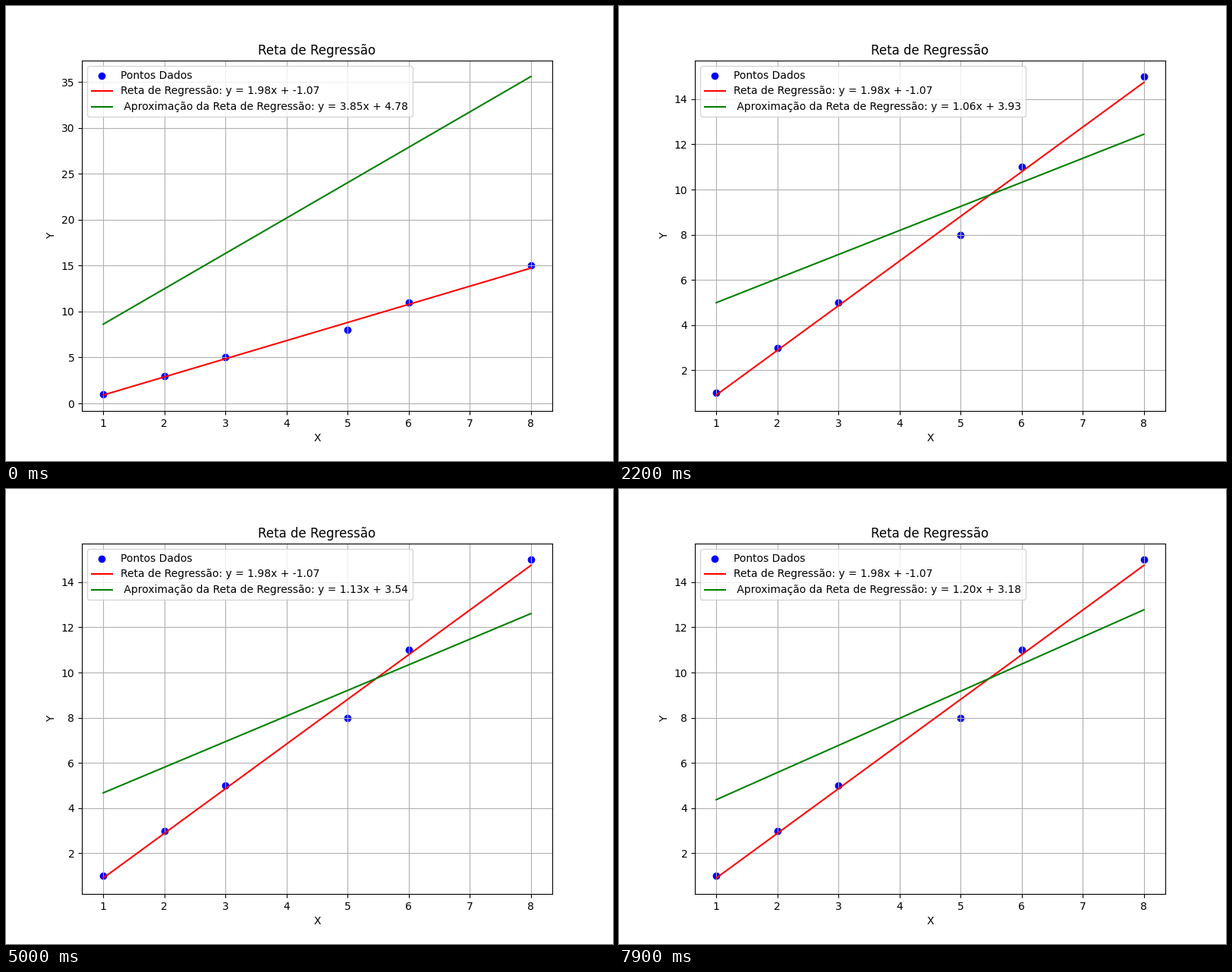
A matplotlib script for the animation above (8000 ms loop, 800 px wide and 600 px high).

```python
import numpy as np
import matplotlib.pyplot as plt
from matplotlib.animation import FuncAnimation

FRAMES = 80
RATE = 0.001
STEP = 0.01

x = np.array([1, 2, 3, 5, 6, 8], dtype=float)
y = np.array([1, 3, 5, 8, 11, 15], dtype=float)
slope, intercept = np.polyfit(x, y, 1)


def cost(m, b):
    return np.sum((y - (m * x + b)) ** 2)


def descend(m, b):
    """One gradient descent step using forward differences."""
    here = cost(m, b)
    dm = (cost(m + STEP, b) - here) / STEP
    db = (cost(m, b + STEP) - here) / STEP
    return m - RATE * dm, b - RATE * db


def descent_path(m, b, count):
    path = []
    for _ in range(count):
        m, b = descend(m, b)
        path.append((m, b))
    return path


path = descent_path(5.0, 5.0, FRAMES)

fig, ax = plt.subplots(figsize=(8, 6), dpi=100)


def draw(i):
    m, b = path[i]
    ax.clear()
    ax.scatter(x, y, color="blue", label="Pontos Dados")
    ax.plot(x, slope * x + intercept, color="red",
            label=f"Reta de Regressão: y = {slope:.2f}x + {intercept:.2f}")
    ax.plot(x, m * x + b, color="green",
            label=f" Aproximação da Reta de Regressão: y = {m:.2f}x + {b:.2f}")
    ax.set_title("Reta de Regressão")
    ax.set_xlabel("X")
    ax.set_ylabel("Y")
    ax.legend(loc="upper left")
    ax.grid(True)


anim = FuncAnimation(fig, draw, frames=FRAMES, init_func=lambda: None,
                     interval=100, repeat=True, repeat_delay=0)
plt.show()
```
